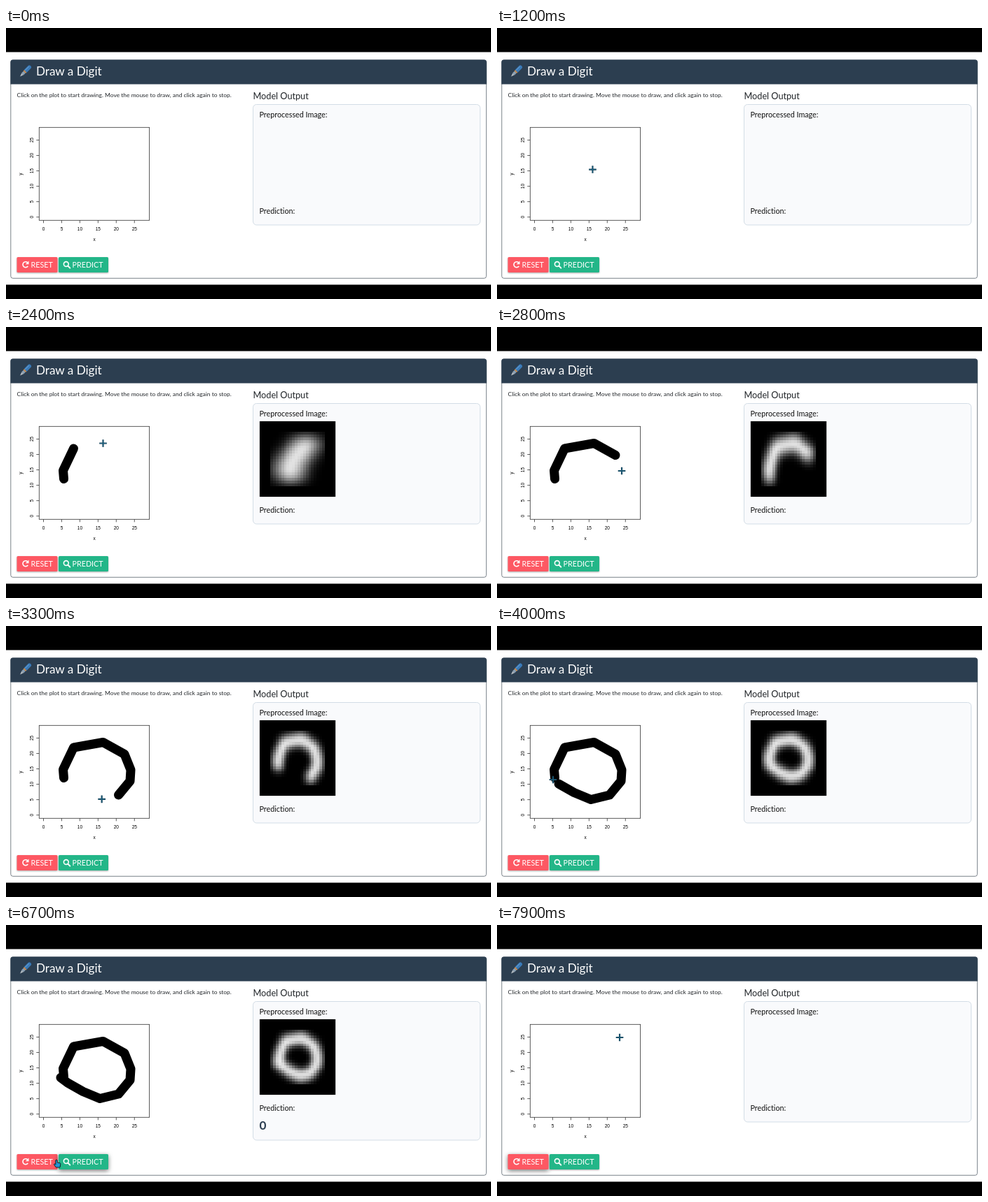
An HTML page with a canvas that plays this animation: 692x388 px, repeating every 8000 ms.

```html
<!DOCTYPE html>
<html lang="en">
<head>
<meta charset="utf-8">
<title>Draw a Digit</title>
<style>
  html, body { margin: 0; width: 100%; height: 100%; overflow: hidden; background: #fff; }
  svg { display: block; position: absolute; left: 0; top: 0; }
  text { font-family: Lato, sans-serif; font-size: 8.45px; font-variant-ligatures: none; fill: #212529; }
  .h5 { font-size: 10.75px; fill: #111; }
  .axis text { font: 6.5px "Liberation Sans", sans-serif; fill: #000; text-anchor: middle; }
  .button { filter: drop-shadow(0 1px 1.2px #0005); }
  .button.raised { filter: drop-shadow(0 2px 3px #0008); }
  .button text { font-size: 10.75px; fill: #fff; }
  #digit { position: absolute; left: 362px; top: 135px; width: 108px; height: 108px; image-rendering: pixelated; transform: scale(1.006); }
</style>
</head>
<body>
<svg width="692" height="388" viewBox="0 0 692 388">
  <path d="M0 0H692V34.5H0ZM0 367.6H692V388H0Z"/>
  <rect x="6.800" y="45.800" width="678.500" height="312.500" rx="3" fill="#fff" stroke="#6b747d" stroke-width=".9"/>
  <path d="M6.400 80.400V48.800Q6.400 45.400 9.800 45.400H682.300Q685.700 45.400 685.700 48.800V80.400Z" fill="#2c3e50"/>
  <g transform="translate(20 69.500) rotate(-45)">
    <path d="M0 0L5 -1.700V1.700Z" fill="#b9c0c6"/>
    <path d="M5 -2H9V2H5Z" fill="#8fa3b5"/>
    <path d="M9 -2.400H11V2.400H9Z" fill="#d08f4f"/>
    <path d="M11 -2.700H19.500Q21.500 -2.700 21.500 0T19.500 2.700H11Z" fill="#3a7ab8"/>
    <path d="M11 -1.200H19" stroke="#7fb0dc" stroke-width=".8"/>
  </g>
  <text x="43" y="67.5" style="font-size:17.1px;fill:#fff">Draw a Digit</text>
  <text x="15.500" y="98.500">Click on the plot to start drawing. Move the mouse to draw, and click again to stop.</text>
  <text x="352.500" y="101.500" style="font-size:12.7px">Model Output</text>

  <rect id="panel" x="352.500" y="109.500" width="324" height="172.500" rx="5" fill="#f9fafc" stroke="#d3dde6"/>
  <text class="h5" x="361.500" y="128.400">Preprocessed Image:</text>
  <text class="h5" x="361.500" y="266.300">Prediction:</text>
  <g id="error">
    <text x="361.500" y="145" style="fill:#dc3545"><tspan font-weight="bold">Error:</tspan> argument is of length</text>
    <text x="361.500" y="158" style="fill:#dc3545">zero</text>
  </g>
  <text id="answer" x="361.500" y="292.800" style="font-size:17.1px;font-weight:bold;fill:#2c3e50">0</text>

  <g class="axis" id="axis">
    <rect x="47.300" y="142.300" width="157.300" height="133" fill="none" stroke="#333" stroke-width=".8"/>
    <text x="126" y="305">x</text>
    <text transform="translate(22.500 209) rotate(-90)">y</text>
  </g>
  <polyline id="ink" fill="none" stroke="#000" stroke-width="13" stroke-linecap="round" stroke-linejoin="round"/>

  <g class="button" id="reset">
    <rect x="15.500" y="328" width="58" height="22" rx="1.500" fill="#fd5863"/>
    <path d="M30.800 335.800A4 4 0 1 0 31.300 341" fill="none" stroke="#fff" stroke-width="1.600"/>
    <path d="M32.500 333.500V338.200H27.800Z" fill="#fff"/>
    <text x="35.500" y="343">RESET</text>
  </g>
  <g class="button" id="predict">
    <rect x="75" y="328" width="71" height="22" rx="1.500" fill="#23b688"/>
    <g fill="none" stroke="#fff"><circle cx="85.800" cy="338" r="3.400" stroke-width="1.600"/>
    <path d="M88.300 340.600L91.300 343.600" stroke-width="2" stroke-linecap="round"/></g>
    <text x="94.500" y="343">PREDICT</text>
  </g>
</svg>
<canvas id="digit" width="28" height="28"></canvas>
<svg width="692" height="388" viewBox="0 0 692 388">
  <g id="cursor">
    <g id="cross"><path d="M-5.300 0H5.300M0 -5.300V5.300" stroke="#143f55" stroke-width="2.200"/>
      <path d="M-4.600 0H4.600M0 -4.600V4.600" stroke="#1d6786" stroke-width=".9"/></g>
    <path id="arrow" d="M0 0V10.500L2.500 8.300L4.200 12L6 11.200L4.400 7.600H7.600Z" fill="#2196d3" stroke="#111" stroke-width=".8"/>
    <path id="hand" d="M-1.200 .8Q0 -.8 1.200 .8V4L5 4.800Q6 5.200 5.800 6.500L5 11H-.6L-3.400 7.300Q-3.600 5.800 -2.300 6L-1.200 7Z" fill="#2196d3" stroke="#111" stroke-width=".9"/>
  </g>
</svg>
<script>
const $ = id => document.getElementById(id);
const LOOP = 8000, STEP = 100, LAG = 150;

// Stroke vertices: x, y, time the pointer passes
const stroke = [
  [82.5, 217.5, 1850], [81.5, 205.5, 1980], [96.5, 174, 2200], [138.5, 166.5, 2400],
  [169, 183.5, 2600], [178, 206, 2800], [177, 222, 2950], [160.5, 242, 3120],
  [134, 248.5, 3320], [110, 238.5, 3550], [88, 226, 3800], [78, 218.5, 4050]
];
const track = [
  [572, 291, 600], [295, 218, 900], [110, 200, 1250], [82, 217, 1500],
  ...stroke.slice(0, 2), [84.5, 189, 2100], ...stroke.slice(2),
  [78, 218, 4400], [107.5, 336, 5000], [107.5, 336, 6400], [72, 336, 6700],
  [57, 335, 6900], [57, 335, 7200], [59, 328.5, 7300], [175, 161, 7900]
];

function pointerAt(t) {
  const i = track.findIndex(k => k[2] > t);
  if (i < 0) return track.at(-1);
  if (i === 0) return track[0];
  const a = track[i - 1], b = track[i], f = (t - a[2]) / (b[2] - a[2]);
  return [a[0] + (b[0] - a[0]) * f, a[1] + (b[1] - a[1]) * f];
}

function buildAxis() {
  let marks = '';
  for (let v = 0; v <= 25; v += 5) {
    const x = 53.5 + v * 5.19, y = 270.7 - v * 4.41;
    marks += `<path d="M${x} 275.3v4M47.3 ${y}h-4" stroke="#333" stroke-width=".8"/>
      <text x="${x}" y="289.5">${v}</text>
      <text transform="translate(38.5 ${y}) rotate(-90)">${v}</text>`;
  }
  $('axis').insertAdjacentHTML('beforeend', marks);
}

// Blur the drawing, then fit its bounding box into the middle 20 x 20 cells
function drawDigit(points) {
  const margin = 18, xs = points.map(p => p[0]), ys = points.map(p => p[1]);
  const left = Math.min(...xs) - margin, top = Math.min(...ys) - margin;
  const sheet = document.createElement('canvas');
  sheet.width = Math.max(...xs) + margin - left;
  sheet.height = Math.max(...ys) + margin - top;
  const pen = sheet.getContext('2d');
  pen.filter = 'blur(7.5px) brightness(1.2)';
  pen.strokeStyle = '#fff';
  pen.lineWidth = 23;
  pen.lineCap = pen.lineJoin = 'round';
  pen.beginPath();
  points.forEach(p => pen.lineTo(p[0] - left, p[1] - top));
  pen.stroke();
  const out = $('digit').getContext('2d');
  out.fillRect(0, 0, 28, 28);
  out.imageSmoothingQuality = 'high';
  out.drawImage(sheet, 4, 4, 20, 20);
}

const show = (id, on) => $(id).style.display = on ? '' : 'none';
let shown = -1;

function render(t) {
  const cleared = t >= 7100;
  const points = cleared ? [] : stroke.filter(p => p[2] + LAG <= t);
  if (points.length !== shown) {
    shown = points.length;
    const drawn = shown > 1;
    $('ink').setAttribute('points', drawn ? points.map(p => p.slice(0, 2)).join(' ') : '');
    show('digit', drawn);
    if (drawn) drawDigit(points);
  }
  const answered = t >= 5600 && !cleared;
  show('error', t >= 1700 && shown < 2 && !cleared);
  show('answer', answered);
  $('panel').setAttribute('height', answered ? 198.5 : 172.5);

  const [x, y] = pointerAt(t);
  const onButton = y >= 328 && x < 146;
  const onPlot = !onButton && x < 225;
  show('cursor', t >= 600);
  show('hand', onButton);
  show('cross', onPlot);
  show('arrow', !onButton && !onPlot);
  $('cursor').setAttribute('transform', `translate(${x} ${y})`);
  $('predict').classList.toggle('raised', t >= 5000 && t < 7000);
  $('reset').classList.toggle('raised', t >= 6800);
}

function tick(now) {
  render(Math.floor(now % LOOP / STEP) * STEP);
  requestAnimationFrame(tick);
}
buildAxis();
render(0);
requestAnimationFrame(tick);
</script>
</body>
</html>
```
